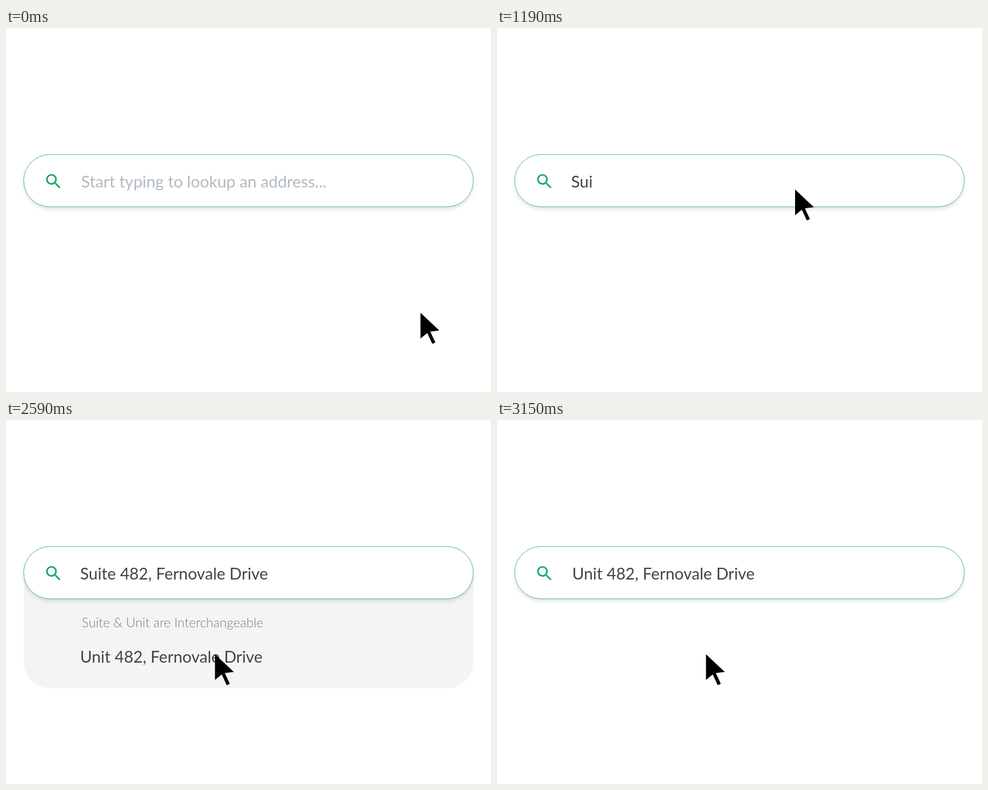
An HTML page for the animation above (3.85 s loop, 864 by 648 pixels).

```html
<!DOCTYPE html>
<html lang="en">
<head>
<meta charset="utf-8">
<title>Address lookup</title>
<style>
  html, body { margin: 0; width: 100%; height: 100%; overflow: hidden; background: #fff; }
  svg { display: block; width: 864px; height: 648px; }
  text { font: 400 28.8px Lato, sans-serif; fill: #434343; white-space: pre; }
  #placeholder { fill: #b1bac1; }
  #hint { font-size: 23.2px; font-weight: 300; fill: #6f7f8f; }
  #bar { fill: #fff; stroke: #4fb58e; stroke-width: 1; }
  #barShadow { fill: #fff; filter: drop-shadow(0 4px 3.5px rgba(0, 0, 0, .13)); }
</style>
</head>
<body>
<svg viewBox="0 0 864 648">
  <defs>
    <clipPath id="panelShape"><rect id="panelClip" x="31.7" y="200" width="800.8" rx="47"/></clipPath>
  </defs>
  <g id="panel">
    <g clip-path="url(#panelShape)">
      <rect x="31" y="272" width="802" height="206" fill="#f4f4f4"/>
      <rect id="hover" x="31" y="382" width="802" height="82.4" fill="#d1d1d1"/>
    </g>
    <g id="suggestion">
      <text id="hint" x="135" y="369">Suite &amp; Unit are Interchangeable</text>
      <text x="132" y="432">Unit 482, Fernovale Drive</text>
    </g>
  </g>
  <rect id="barShadow" x="32" y="226" width="800" height="92" rx="46"/>
  <rect id="bar" x="31.5" y="225.3" width="801" height="92.9" rx="46.4"/>
  <path transform="translate(67 255.5) scale(1.47)" fill="#14a966"
    d="M15.5 14h-.79l-.28-.27A6.47 6.47 0 0 0 16 9.5 6.5 6.5 0 1 0 9.5 16c1.61 0 3.09-.59 4.23-1.57l.27.28v.79l5 4.99L20.49 19zm-6 0a4.5 4.5 0 1 1 0-9 4.5 4.5 0 0 1 0 9z"/>
  <text id="placeholder" x="134" y="283.6">Start typing to lookup an address...</text>
  <text id="value" y="283.6"></text>
  <path id="cursor" d="M0 0L33.5 31.5 17.5 33.5 26.4 52.6Q24 54.6 20.9 54.9L12 36 0 45.8z"/>
</svg>
<script>
  const LOOP = 3850, STEP = 70;
  const TYPED = "Suite 482, Fernovale Drive";
  const CHOSEN = "Unit 482, Fernovale Drive";
  const $ = id => document.getElementById(id);
  const clamp = (v, lo = 0, hi = 1) => Math.min(hi, Math.max(lo, v));

  // 0 at time a, 1 at time b, linear between
  const ramp = (t, a, b) => clamp((t - a) / (b - a));

  const cursorStart = [738.4, 507];
  // [start, end, x, y]: moves from the previous place
  const cursorMoves = [
    [0, 700, 531, 287.5],
    [2240, 2590, 372.3, 417]
  ];

  function cursorAt(t) {
    let [x, y] = cursorStart;
    for (const [start, end, toX, toY] of cursorMoves) {
      const p = ramp(t, start, end);
      x += (toX - x) * p;
      y += (toY - y) * p;
    }
    return [x, y];
  }

  function draw(now) {
    const t = Math.floor((now % LOOP) / STEP) * STEP;
    const chosen = t >= 3080;

    $("cursor").setAttribute("transform", `translate(${cursorAt(t)})`);
    $("placeholder").setAttribute("opacity", 1 - ramp(t, 840, 980));

    const count = t < 1190 ? 0 : Math.floor(3 + 2.5 * (t - 1190) / STEP);
    $("value").textContent = chosen ? CHOSEN : TYPED.slice(0, count);
    $("value").setAttribute("x", chosen ? 134 : 132);

    const bottom = 318 + 159.5 * ramp(t, 1540, 1820);
    $("panelClip").setAttribute("height", bottom - 200);
    $("panel").setAttribute("opacity", t < 1540 ? 0 : 1 - ramp(t, 3010, 3150));
    $("suggestion").setAttribute("opacity", ramp(t, 1820, 1960));
    $("hover").setAttribute("opacity", t >= 2870 ? 1 : 0);

    requestAnimationFrame(draw);
  }
  draw(0);
</script>
</body>
</html>
```
